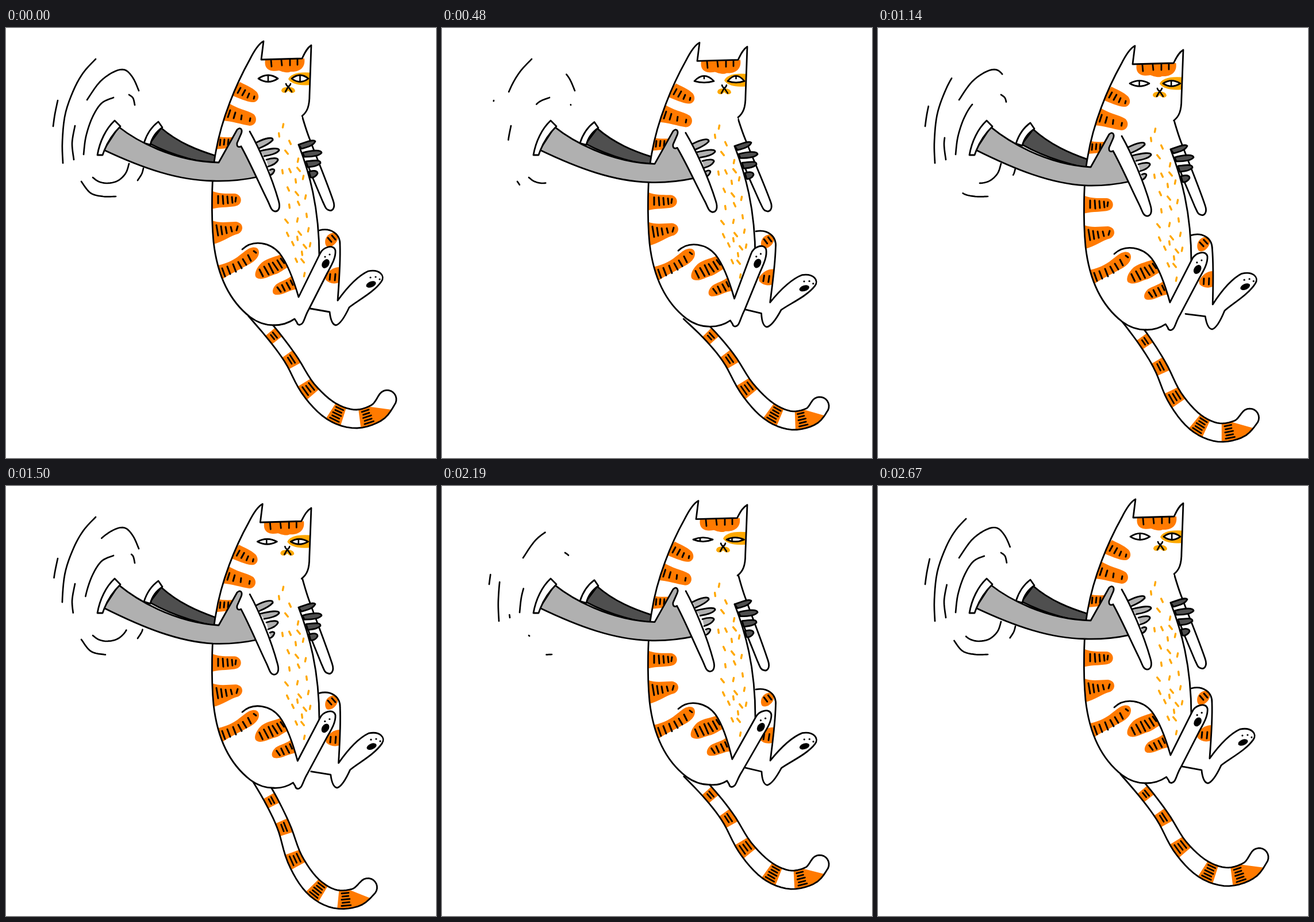
An HTML page with a canvas that plays this animation: 748x748 px, repeating every 2.7 s.

```html
<!DOCTYPE html>
<html lang="en">
<head>
<meta charset="utf-8">
<title>Held cat</title>
<style>
html, body { margin: 0; width: 100%; height: 100%; overflow: hidden; background: #fff; }
canvas { display: block; }
</style>
</head>
<body>
<canvas id="stage" width="748" height="748"></canvas>
<script>
const ctx = document.getElementById('stage').getContext('2d');
const LOOP = 2700, STEP = 30;
const ORANGE = '#ff7a00', AMBER = '#ffa800', LIGHT = '#b0b0b0', DARK = '#4f4f4f';

// time, tail root, tail bend, far leg, near leg, near foot, paws (degrees), head shift (px)
const POSE = [
  [0, 0, 0, 0, 0, 0, 0, 0],
  [270, -3, 7, 2, 0, -3, -.7, 0],
  [480, -6, 8.5, 3.4, .3, -5, -1.2, 0],
  [810, 0, .5, -4.6, .3, 0, -1.2, 0],
  [1110, 3, 3, -3, .8, 0, 0, -1],
  [1500, 10, 2.5, -.8, 1.3, 0, .9, -1.7],
  [1920, -3.5, 9, 4, 4, 0, 1.3, -2],
  [2190, -3.5, 6, 3.2, 3, 0, 1, -2]
];

// time, eye corner, upper lid, lower lid, pupil shift, pupil length
const EYES = [
  [0, 88, 82, 93.5, 0, 1],
  [480, 90, 81, 92.5, 0, .4],
  [720, 90, 84, 92, 0, .4],
  [780, 88.5, 91, 91, 0, 0],
  [870, 88.5, 91, 91, 0, 0],
  [960, 88.5, 83.5, 93.5, 0, 1],
  [1500, 88.5, 84, 93, -1, 1],
  [1920, 90, 86.5, 93.5, -5, 1],
  [2190, 90.5, 87, 94, -5, 1]
];

// erase duration, regrow start, points
const WHOOSH = [
  [830, 590, [[99, 235], [98, 198], [103, 150], [118, 107], [135, 77], [156, 54]]],
  [660, 590, [[141, 125], [163, 94], [188, 76], [207, 73], [221, 87], [231, 109]]],
  [660, 590, [[135, 220], [139, 189], [150, 156], [166, 131], [187, 121]]],
  [500, 480, [[214, 116], [221, 122], [224, 134]]],
  [500, 480, [[82, 171], [85, 150], [90, 126]]],
  [820, 770, [[118, 229], [115, 200], [120, 170]]],
  [870, 840, [[214, 236], [208, 253], [194, 266], [176, 270], [161, 267], [151, 260]]],
  [540, 740, [[191, 293], [169, 293], [147, 287], [131, 267]]],
  [480, 860, [[239, 244], [236, 254], [229, 265]]]
];

const OUTLINE = 'M515 153 C524 146 528 136 528 116 L531 30 C523 35 519 45 515 53 L444 55 L448 23 ' +
  'C438 28 430 43 424 55 C400 98 375 158 365 215 C357 255 357 330 361 372 ' +
  'C367 425 385 472 425 503 C437 512 452 517 466 517';
const BODY = OUTLINE + ' L500 510 L545 400 C545 310 527 250 509 203 Z';
const BELLY = 'M509 203 C527 250 545 310 545 400';

// shape, ticks
const STRIPES = [
  ['M407 94 C414 98 428 103 436 111 C443 120 438 130 428 129 C418 128 405 122 390 116 Z',
   'M408 104 L403 113 M416 108 L411 117 M423 114 L420 121 M432 119 L431 123'],
  ['M387 130 C400 140 420 143 431 150 C439 158 434 170 424 170 C410 168 395 162 374 161 Z',
   'M390 143 L386 155 M399 147 L396 157 M410 152 L409 159 M425 157 L424 162'],
  ['M366 188 C378 191 388 190 397 190 L388 209 C378 210 370 210 360 212 Z',
   'M373 194 L372 204 M380 194 L379 203 M387 194 L386 203'],
  ['M354 281 C366 289 385 288 398 288 C411 290 412 305 402 309 C390 313 372 310 354 316 Z',
   'M369 292 L369 305 M377 292 L378 306 M385 293 L386 305 M393 294 L394 304 M400 295 L399 302'],
  ['M354 333 C370 341 385 337 400 337 C414 339 414 353 404 358 C390 361 378 373 356 377 Z',
   'M366 343 L369 361 M374 345 L376 359 M382 346 L384 357 M391 346 L393 354 M403 345 L401 352'],
  ['M364 414 C395 408 405 396 416 388 C428 378 440 380 440 390 C440 405 420 412 410 418 C395 426 385 430 370 442 Z',
   'M376 418 L381 432 M385 415 L390 428 M395 411 L400 424 M404 407 L410 418 M412 402 L418 412 M421 395 L426 405 M431 388 L435 391']
];
const THIGH_STRIPES = [
  ['M482 392 C470 398 455 400 445 408 C434 418 430 432 437 435 C447 440 460 430 470 428 C480 424 486 417 494 415 Z',
   'M441 420 L447 432 M449 415 L457 429 M457 410 L465 426 M464 408 L473 421 M472 404 L480 417 M478 401 L484 409'],
  ['M498 430 C490 438 478 440 470 446 C461 455 463 464 470 464 C482 465 493 455 508 454 Z',
   'M472 451 L478 459 M480 447 L485 457 M488 443 L494 454 M495 439 L499 447']
];
const FAR_STRIPES = [
  ['M556 377 C552 364 564 353 575 357 C580 364 577 373 568 379 C561 382 557 381 556 377 Z',
   'M560 365 L566 372 M567 361 L573 368'],
  ['M555 432 C562 421 570 416 580 416 L579 443 C570 446 562 444 556 438 Z',
   'M564 428 L563 438 M573 428 L572 439']
];
const NEAR_LEG = 'M411 385 C430 367 460 373 476 392 C490 410 500 437 509 468 L546 393 ' +
  'C551 381 570 375 573 387 C574 400 566 413 559 426 L527 489 C521 499 519 509 516 513 ' +
  'C512 518 507 517 506 512 L502 506 C492 513 480 517 466 517';
const FAR_LEG = 'M545 352 C565 347 582 358 581 378 C582 410 579 445 577 474 C590 456 610 432 630 423 ' +
  'C650 419 660 431 653 441 C640 460 610 475 597 486 C590 501 582 515 574 517 C566 516 564 503 563 494 L529 488';
const FAR_PAW = 'M515 153 C520 170 524 183 529 195 C540 225 557 265 569 300 C574 314 567 319 562 317 C556 316 555 310 551 302 L532 257 L524 235';
const NEAR_PAW = 'M424 180 C440 208 462 258 474 300 C478 313 474 319 468 319 C461 318 460 310 455 300 C440 270 425 235 409 206';
const NEAR_ARM = 'M438 259 C415 264 390 267 360 266 C300 265 240 245 170 212 L196 172 C225 195 290 232 370 234 ' +
  'L402 177 C408 171 412 177 409 184 L402 200 C401 207 405 208 409 206';
const NEAR_CUFF = 'M189 161 L199 171 C185 185 176 200 171 213 L168 221 L159 221 C163 197 174 175 189 161 Z';
const DARK_ARM = 'M270 174 C300 200 335 213 364 222 L400 230 L400 242 C340 236 290 222 250 201 Z';
const DARK_CUFF = 'M265 163 L272 173 C262 180 254 190 251 203 L240 200 C245 184 253 172 265 163 Z';
const NEAR_FINGERS = 'M436 199 C450 192 465 188 464 195 C458 202 448 206 441 209 ' +
  'M442 214 C458 210 476 207 475 213 C470 219 460 221 449 223 ' +
  'M453 229 C462 226 474 225 473 230 C470 236 463 239 456 241 M459 247 C464 244 469 246 466 250 C465 253 462 255 460 256';
const DARK_FINGERS = 'M509 203 C520 199 535 193 538 197 C535 205 522 208 514 210 Z ' +
  'M516 217 C530 213 548 211 549 217 C545 223 530 224 519 224 Z ' +
  'M522 232 C533 231 548 228 547 235 C541 241 533 241 525 242 Z ' +
  'M527 250 C534 247 542 248 542 253 C540 258 534 261 530 260 Z';

const FRECKLES = [
  [482, 170], [475, 186], [494, 199], [488, 216], [508, 230], [481, 250], [494, 248], [509, 246],
  [517, 260], [504, 266], [491, 280], [506, 288], [521, 294], [493, 310], [509, 305], [488, 336],
  [507, 334], [523, 326], [490, 359], [511, 357], [526, 351], [507, 366], [499, 375], [520, 380],
  [529, 377], [515, 392], [505, 404], [516, 405], [519, 429]
];
const TAIL = [[430, 494], [465, 535], [496, 577], [526, 628], [565, 666], [607, 680], [645, 669], [663, 646]];
// start, end on the inner side, end on the outer side, ticks
const BANDS = [[.85, 1.2, 1.2, 2], [1.78, 2.22, 2.22, 2], [2.77, 3.22, 3.22, 3], [4, 4.52, 4.52, 5], [5.2, 5.75, 6.55, 5]];

const clamp = (v, lo = 0, hi = 1) => Math.min(hi, Math.max(lo, v));
const smooth = v => (v = clamp(v)) * v * (3 - 2 * v);

function turn([x, y], [cx, cy], deg) {
  const a = deg * Math.PI / 180, c = Math.cos(a), s = Math.sin(a);
  return [cx + (x - cx) * c - (y - cy) * s, cy + (x - cx) * s + (y - cy) * c];
}

function curve(p) {
  return u => {
    const i = clamp(Math.floor(u), 0, p.length - 2), f = u - i;
    const [a, b, c, d] = [-1, 0, 1, 2].map(k => p[clamp(i + k, 0, p.length - 1)]);
    return [0, 1].map(k => .5 * (2 * b[k] + (c[k] - a[k]) * f + (2 * a[k] - 5 * b[k] + 4 * c[k] - d[k]) * f * f +
      (3 * b[k] - a[k] - 3 * c[k] + d[k]) * f ** 3));
  };
}

// Looping interpolation through table rows
function keyed(rows, t, soft) {
  const n = rows.length;
  const row = i => {
    const r = rows[(i + n) % n];
    return [r[0] + LOOP * Math.floor(i / n), ...r.slice(1)];
  };
  let i = n - 1;
  while (rows[i][0] > t) i--;
  const [a, b, c, d] = [-1, 0, 1, 2].map(k => row(i + k));
  const h = c[0] - b[0], f = (t - b[0]) / h;
  return b.slice(1).map((v, j) => {
    const k = j + 1;
    if (!soft) return v + (c[k] - v) * f;
    const m0 = (c[k] - a[k]) / (c[0] - a[0]) * h, m1 = (d[k] - v) / (d[0] - b[0]) * h;
    return v + (c[k] - v) * f * f * (3 - 2 * f) + m0 * f * (1 - f) ** 2 - m1 * f * f * (1 - f);
  });
}

const path = (d, fn) => new Path2D(!fn ? d : d.replace(/([\d.]+) ([\d.]+)/g, (_, x, y) => fn([+x, +y]).join(' ')));

function poly(points) {
  const p = new Path2D();
  points.forEach(q => p.lineTo(...q));
  return p;
}

function fill(p, color = '#fff') {
  ctx.fillStyle = color;
  ctx.fill(p);
}

function stroke(p, width = 2.8, color = '#000') {
  ctx.lineWidth = width;
  ctx.strokeStyle = color;
  ctx.stroke(p);
}

function shape(p, color) {
  fill(p, color);
  stroke(p);
}

function clipped(p, draw) {
  ctx.save();
  ctx.clip(p);
  draw();
  ctx.restore();
}

const stripes = (list, fn) => list.forEach(([d, ticks]) => {
  fill(path(d, fn), ORANGE);
  stroke(path(ticks, fn), 3);
});

function oval([x, y], rx, ry = rx, deg = 0) {
  ctx.fillStyle = '#000';
  ctx.beginPath();
  ctx.ellipse(x, y, rx, ry, deg * Math.PI / 180, 0, 7);
  ctx.fill();
}

function drawWhoosh(t) {
  const ph = t % (LOOP / 2);
  for (const [len, grow, pts] of WHOOSH) {
    const at = curve(pts), n = pts.length - 1;
    const part = (a, b) => {
      if (b - a < .004) return;
      stroke(poly(Array.from({ length: 25 }, (_, i) => at(n * (a + (b - a) * i / 24)))), 2.7);
    };
    part(ph / len, 1);
    part(0, (ph - grow) / (LOOP / 2 - grow));
  }
}

function drawTail(root, bend) {
  const at = curve(TAIL.map((p, i) => turn(p, [445, 515], root + bend * i / 7)));
  const edge = (u, v) => {
    const [x, y] = at(u), [x0, y0] = at(u - .02), [x1, y1] = at(u + .02);
    const l = Math.hypot(x1 - x0, y1 - y0), h = v * (11 + 5 * smooth((u - 1.5) / 3));
    return [x - (y1 - y0) / l * h, y + (x1 - x0) / l * h];
  };
  const run = (a, b, v) => Array.from({ length: 41 }, (_, i) => edge(a + (b - a) * i / 40, v));
  const end = at(7), rim = edge(7, 1);
  const cap = Array.from({ length: 13 }, (_, i) => turn(rim, end, -15 * i));
  const body = poly([...run(0, 7, 1), ...cap, ...run(7, 0, -1)]);
  fill(body);
  for (const [a, inner, outer, n] of BANDS) {
    fill(poly([...run(a, outer, 1), ...run(inner, a, -1)]), ORANGE);
    const mid = (a + inner) / 2 + (outer > inner ? .05 : 0);
    for (let i = 0; i < n; i++) {
      const v = (i - (n - 1) / 2) * (n > 3 ? .34 : .5), w = (inner - a) * (i % 2 ? .26 : .32);
      stroke(poly([edge(mid - w, v), edge(mid + w, v)]), 2.8);
    }
  }
  stroke(body);
}

function drawFace(t, lean) {
  const [corner, top, low, look, len] = keyed(EYES, t);
  fill(path('M451 55 C448 72 460 77 475 74 C480 76 490 79 495 76 C515 77 521 65 519 53 Z', lean), ORANGE);
  stroke(path('M461 56 L462 67 M479 56 L480 65 M494 55 L494 65 M507 54 L507 64', lean), 2.8);
  fill(path('M491 89 C494 80 510 75 534 78 L534 98 C515 102 497 98 491 89 Z', lean), AMBER);
  fill(path('M479 109 C480 102 488 103 491 103 C497 102 503 105 503 110 C500 115 494 113 491 109 C486 115 480 113 479 109 Z', lean), AMBER);
  stroke(path('M487 97 Q488 101 491 102 Q494 101 495 97 M491 102 L486 111 M491 102 L497 111', lean), 2.6);
  for (const [a, b] of [[439, 473], [497, 526]]) {
    const m = (a + b) / 2, bulge = y => 2 * y - corner;
    const eye = path(`M${a} ${corner} Q${m} ${bulge(top)} ${b} ${corner} Q${m} ${bulge(low)} ${a} ${corner} Z`, lean);
    fill(eye);
    clipped(eye, () => {
      if (len > .1) stroke(path(`M${m + look} ${top} L${m + look} ${top + (low - top) * len}`, lean), 2.6);
    });
    stroke(eye, 2.8);
  }
}

function draw(t) {
  const [root, bend, far, near, foot, paw, hx] = keyed(POSE, t, true);
  const dy = 4.25 * (1 - Math.cos(2 * Math.PI * t / LOOP));
  const lean = ([x, y]) => [x + hx * clamp((200 - y) / 80) * clamp((531 - x) / 20), y];
  const reach = len => ([x, y]) => [x, y + dy * (smooth((x - 180) / len) - 1)];
  const farTurn = p => turn(p, [558, 368], far);
  const pawTurn = c => p => turn(p, c, paw);
  const nearTurn = p => {
    const w = p[1] > 500 ? clamp((p[0] - 466) / 36) : clamp((p[0] - 411) / 60);
    return turn(p[0] > 512 && p[1] < 495 ? turn(p, [511, 490], foot) : p, [420, 390], near * w);
  };

  ctx.setTransform(1, 0, 0, 1, 0, 0);
  ctx.lineCap = ctx.lineJoin = 'round';
  ctx.fillStyle = '#fff';
  ctx.fillRect(0, 0, 748, 748);
  drawWhoosh(t);
  ctx.translate(0, dy);

  shape(path(DARK_ARM, reach(260)), DARK);
  shape(path(DARK_CUFF, reach(260)));
  drawTail(root, bend);

  const farLeg = path(FAR_LEG, farTurn);
  fill(farLeg);
  stripes(FAR_STRIPES, farTurn);
  stroke(farLeg);
  oval(farTurn([635, 446]), 9, 5, far - 22);
  [[634, 434], [643, 433], [650, 437]].forEach(p => oval(farTurn(p), 1.6));

  shape(path(FAR_PAW, pawTurn([520, 190])));

  const body = path(BODY, lean), leg = path(NEAR_LEG, nearTurn);
  fill(body);
  stroke(path(BELLY));
  FRECKLES.forEach(([x, y], i) => {
    const k = i % 4 - .6;
    stroke(poly([[x - k, y - 3], [x + k, y + 3]]), 3.4, AMBER);
  });
  fill(leg);
  clipped(leg, () => stripes(THIGH_STRIPES, nearTurn));
  clipped(body, () => {
    stripes(STRIPES, lean);
    drawFace(t, lean);
  });
  stroke(path(OUTLINE, lean));
  stroke(leg);
  oval(nearTurn([556, 410]), 6, 8.5, 32 + near + foot);
  [[555, 398], [563, 394]].forEach(p => oval(nearTurn(p), 1.6));

  shape(path(NEAR_ARM, reach(190)), LIGHT);
  shape(path(NEAR_CUFF, reach(190)));
  shape(path(NEAR_FINGERS), LIGHT);
  shape(path(NEAR_PAW, pawTurn([415, 190])));
  shape(path(DARK_FINGERS), DARK);
}

const start = performance.now();
function tick(now) {
  const t = Math.max(0, now - start) % LOOP;
  draw(t - t % STEP);
  requestAnimationFrame(tick);
}
draw(0);
requestAnimationFrame(tick);
</script>
</body>
</html>
```
